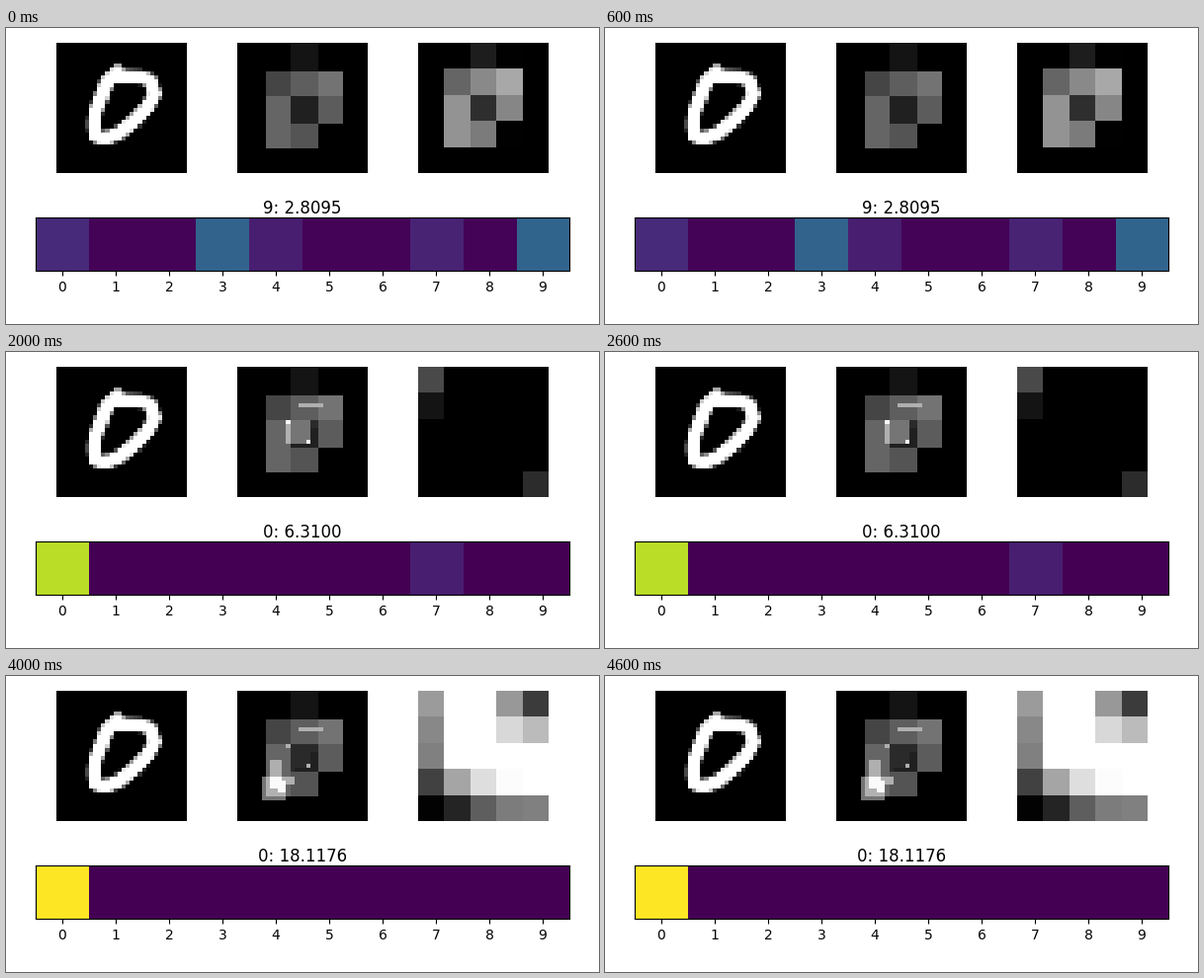
Recreate the animation shown at these times as a matplotlib script. Size 600 px wide and 300 px high, loop 5000 ms.

```python
import numpy as np
import matplotlib.pyplot as plt
from matplotlib.animation import FuncAnimation

W, H, N, CELLS = 600, 300, 32, 5
PATCH, DIM, FLOOR, GLOW = 6, 0.685, 42, 75
plt.rcParams["font.family"] = "DejaVu Sans"

# Centre line of the handwritten zero, in grid units
STROKE = [(15, 7), (12.4, 9.7), (11.2, 12.8), (9.6, 17), (9.3, 20),
          (9.6, 22.8), (12, 23.5), (15.6, 22), (19.1, 19.2), (22.3, 15.8),
          (24.1, 12.5), (23, 9.3), (20.5, 8.4), (14.2, 8.2)]

# Corner of the lit patch and of the sampled area after the first look
PATCHES = [(15, 9), (12, 13), (8, 17), (6, 21)]
GAZES = [(15, 9), (12, 13), (9, 17), (7, 20)]

# Leading class probabilities; the other classes share the rest evenly
LEADERS = [
    {0: .12, 3: .32, 4: .085, 7: .1, 9: .322},
    {0: .375, 3: .485, 5: .046, 7: .046, 9: .046},
    {0: .895, 7: .083},
    {0: 1},
    {0: 1},
]
TITLES = ["9: 2.8095", "3: 4.1279", "0: 6.3100", "0: 12.4916", "0: 18.1176"]


def draw_digit():
    y, x = np.mgrid[:N, :N] + 0.5
    dist = np.full((N, N), np.inf)
    for (ax, ay), (bx, by) in zip(STROKE, STROKE[1:]):
        dx, dy = bx - ax, by - ay
        t = np.clip(((x - ax) * dx + (y - ay) * dy) / (dx**2 + dy**2), 0, 1)
        dist = np.minimum(dist, np.hypot(x - ax - t * dx, y - ay - t * dy))
    return 255 * np.clip(1.4 * (2.05 - dist), 0, 1)


DIGIT = draw_digit()
CELL = np.arange(N) * CELLS // N


def overview():
    """Mean brightness of the digit on a coarse grid."""
    pool = (CELL == np.arange(CELLS)[:, None]).astype(float)
    pool /= pool.sum(axis=1, keepdims=True)
    return pool @ DIGIT @ pool.T


def window(img, corner):
    x, y = corner
    return img[y:y + PATCH, x:x + PATCH]


def canvas(step):
    img = DIM * overview()[np.ix_(CELL, CELL)]
    for corner in PATCHES[:step]:
        seen = np.where(window(DIGIT, corner) > 140, DIM * 255, FLOOR)
        part = window(img, corner)
        np.maximum(part, seen, out=part)
    if step:
        part = window(img, PATCHES[step - 1])
        part += GLOW
    return np.clip(img, 0, 255)


def glimpse(step):
    if step == 0:
        return overview()
    a = window(DIGIT, GAZES[step - 1])
    rows = (a[1:] + a[:-1]) / 2
    return (rows[:, 1:] + rows[:, :-1]) / 2


def probabilities(step):
    lead = LEADERS[step]
    row = np.full((1, 10), (1 - sum(lead.values())) / (10 - len(lead)))
    row[0, list(lead)] = list(lead.values())
    return row


def px_axes(left, top, width, height):
    return fig.add_axes([left / W, 1 - (top + height) / H,
                         width / W, height / H])


def show(ax, img, cmap, vmax):
    return ax.imshow(img, cmap=cmap, vmin=0, vmax=vmax,
                     interpolation="nearest", aspect="auto")


def gray_panel(left, img):
    ax = px_axes(left, 15, 131.99, 132)
    ax.axis("off")
    return show(ax, img, "gray", 255)


fig = plt.figure(figsize=(W / 100, H / 100), dpi=100, facecolor="white")
gray_panel(51, DIGIT)
canvas_im = gray_panel(234, canvas(0))
glimpse_im = gray_panel(417, glimpse(0))

bar = px_axes(29.98, 192, 540.04, 54)
bar_im = show(bar, probabilities(0), "viridis", 1)
bar.set_xticks(range(10))
bar.set_yticks([])
title = bar.set_title(TITLES[0], fontsize=12, pad=1.5)


def update(step):
    canvas_im.set_data(canvas(step))
    glimpse_im.set_data(glimpse(step))
    bar_im.set_data(probabilities(step))
    title.set_text(TITLES[step])
    return canvas_im, glimpse_im, bar_im, title


anim = FuncAnimation(fig, update, frames=len(TITLES), interval=1000,
                     repeat=True, repeat_delay=0, blit=False)
plt.show()
```
